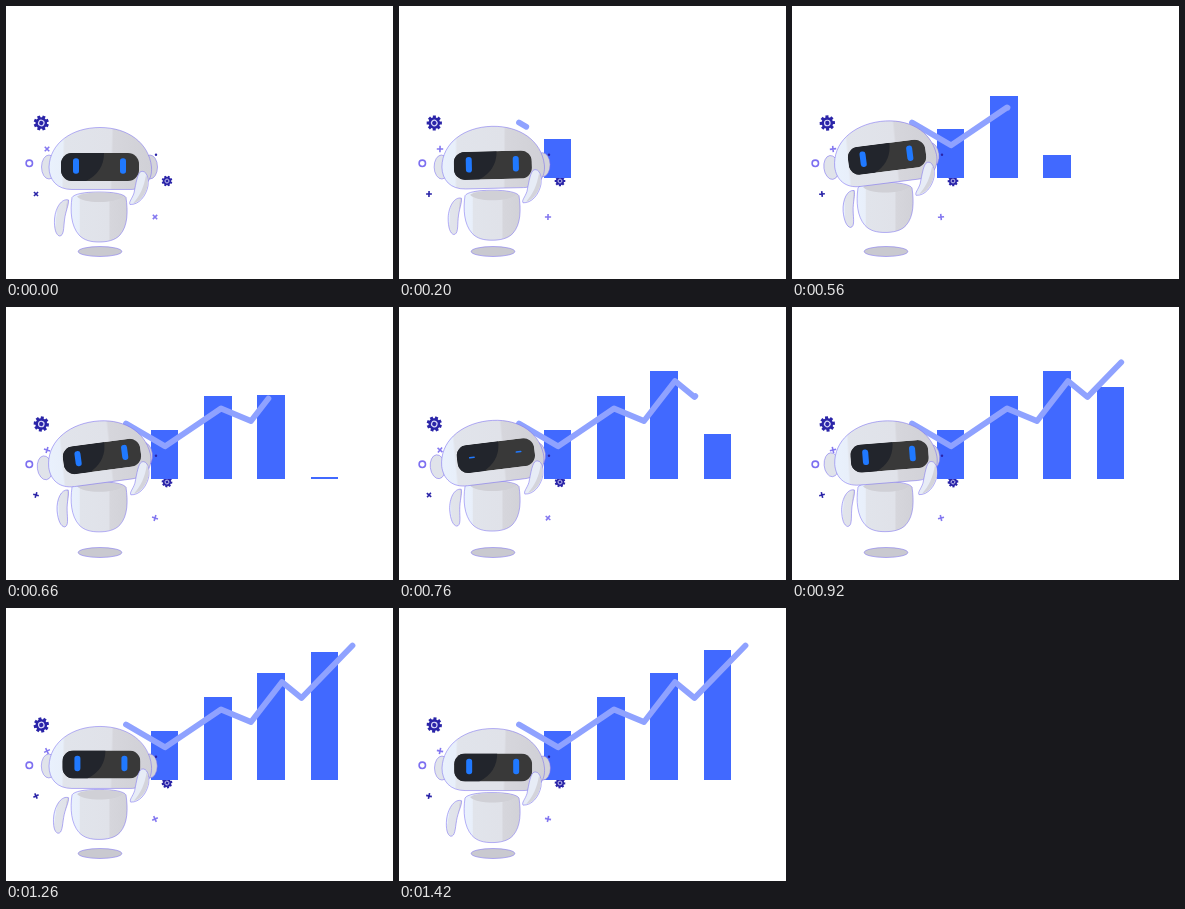
Write an HTML page that moves like this. It is 387 px wide and 273 px high and loops after 1.44 s.

```html
<!DOCTYPE html>
<html lang="en">
<head>
<meta charset="utf-8">
<title>Robot with growing chart</title>
<style>
html, body { margin: 0; width: 100%; height: 100%; overflow: hidden; background: #fff; }
svg { display: block; width: 100vw; height: 100vh; }
.edge { stroke: #766af0; stroke-width: .65; stroke-opacity: .8; }
</style>
</head>
<body>
<svg viewBox="0 0 387 273" xmlns="http://www.w3.org/2000/svg">
  <defs>
    <linearGradient id="shade" gradientUnits="userSpaceOnUse" x1="43" y1="150" x2="146" y2="153">
      <stop offset="0" stop-color="#e9f1fd"/><stop offset=".13" stop-color="#e8effa"/>
      <stop offset=".15" stop-color="#e1e4eb"/><stop offset=".6" stop-color="#e0e2e9"/>
      <stop offset=".62" stop-color="#d6d6dc"/><stop offset="1" stop-color="#d0d0d6"/>
    </linearGradient>
    <linearGradient id="bodyShade" href="#shade" x1="65" y1="0" x2="128" y2="0"/>
    <linearGradient id="armShade" href="#shade" x1="48" y1="210" x2="66" y2="212"/>
    <clipPath id="visor"><rect x="55" y="147" width="78" height="28" rx="11"/></clipPath>
  </defs>

  <g id="decor"></g>
  <circle cx="23.3" cy="157.3" r="3.2" fill="none" stroke="#7d6ff0" stroke-width="1.6"/>
  <g id="bars" fill="#4169ff" shape-rendering="crispEdges"></g>
  <path id="trend" fill="none" stroke="#8fa2ff" stroke-width="5.8" stroke-linejoin="round" stroke-linecap="round"/>

  <ellipse class="edge" cx="94" cy="245.5" rx="21.8" ry="5" fill="#c9c9d0"/>
  <g id="body">
    <path class="edge" fill="url(#bodyShade)" d="M66 191.5C64 205 65 220 73 229C78 234.500 85 236 93 236C101 236 109 234.500 114 229C122 220 122 205 120 191.500C118 188 108 186 93 186C78 186 68 188 66 191.500Z"/>
    <path fill="#d0d0d6" d="M71 190.500C76 187.500 84 186.500 93 186.500C103 186.500 112 187.500 117 190.500C112 194.500 104 196 93 196C83 196 75 194.500 71 190.500Z"/>
  </g>
  <path id="leftArm" class="edge" fill="url(#armShade)" d="M62.500 194C56 192 49.500 201 48.500 213C48 223 50 229 53.500 230C58 230 57.500 222 58.500 214C59.500 205 63 199 62.500 194Z"/>
  <g id="head">
    <g id="ears" class="edge">
      <ellipse cx="43" cy="161" rx="7.500" ry="12" fill="#e0e3ea"/>
      <ellipse cx="144" cy="161" rx="7.500" ry="12" fill="#d3d3da"/>
    </g>
    <path class="edge" fill="url(#shade)" d="M43 161C44 137 66 121.500 94 121.500C122 121.500 143 137 145.500 161C146.500 174 139 183.500 124 183.500H66C51 183.500 43 174 43 161Z"/>
    <g id="face">
      <g clip-path="url(#visor)">
        <path fill="#393939" d="M55 147H133V175H55Z"/>
        <path fill="#22252c" d="M55 147H98Q98 166 80 175H55Z"/>
      </g>
      <g id="eyes" fill="#2079ff"></g>
    </g>
  </g>
  <g id="rightArm">
    <path class="edge" fill="#e7ecf6" d="M124 198.500C122.500 196 126 193 128 187C130 177 131.500 167 135 165.500C140.500 164 143 172 142 180C140 190 133 199 124 198.500Z"/>
    <path fill="#d4d4db" d="M127 197.500C134 190 138 181 140 169C142 172 142 176 141.500 180C139.500 189 133 196.500 127 197.500Z"/>
  </g>
  <circle cx="150" cy="148.700" r="1.200" fill="#2a24a8"/>
</svg>

<script>
const LOOP = 1440, BOB = 1600, FLOOR = 172;
const DARK = '#2a24a8', LILAC = '#8478f0';
const $ = id => document.getElementById(id);

function set(el, attrs) {
  for (const k in attrs) el.setAttribute(k, attrs[k]);
}
function add(parent, tag, attrs = {}) {
  const el = document.createElementNS('http://www.w3.org/2000/svg', tag);
  set(el, attrs);
  parent.append(el);
  return el;
}

const ramp = (t, from, to) => Math.min(1, Math.max(0, (t - from) / (to - from)));
// Rises from 0 to 1 and falls back between two times
const bump = (t, from, to) => Math.sin(Math.PI * ramp(t, from, to)) ** 2;
const inOut = u => u < .5 ? 4 * u ** 3 : 1 - 4 * (1 - u) ** 3;
const outBack = (u, s) => 1 + (s + 1) * (u - 1) ** 3 + s * (u - 1) ** 2;

const bars = [
  { top: 49, start: 95, time: 450, back: 1.7 },
  { top: 83, start: 300, time: 320, back: 0 },
  { top: 107, start: 536, time: 430, back: 1 },
  { top: 130, start: 657, time: 790, back: 0 }
];
bars.forEach((b, i) => {
  b.el = add($('bars'), 'rect', { x: 144.9 + 53.25 * i, width: 27.5 });
});

const points = [[120, 116.5], [159, 139.3], [215, 101.5], [245, 114], [276, 74], [295.5, 90], [346.5, 37.5]];
const segments = points.slice(1).map(([x, y], i) => {
  const [x0, y0] = points[i], dx = x - x0, dy = y - y0;
  return { x0, y0, dx, dy, len: Math.hypot(dx, dy) };
});
const total = segments.reduce((sum, s) => sum + s.len, 0);

function trendPath(left) {
  let d = 'M' + points[0];
  for (const { x0, y0, dx, dy, len } of segments) {
    if (left <= 0) break;
    const k = Math.min(1, left / len);
    d += `L${x0 + dx * k} ${y0 + dy * k}`;
    left -= len;
  }
  return d;
}

function gear(x, y, r) {
  const g = add($('decor'), 'g');
  for (let a = 0; a < 360; a += 45) {
    add(g, 'rect', {
      x: -r * .2, y: -r, width: r * .4, height: r * .45,
      fill: DARK, transform: `rotate(${a})`
    });
  }
  add(g, 'circle', { r: r * .76, fill: DARK });
  add(g, 'circle', { r: r * .36, fill: 'none', stroke: '#d9d8f8', 'stroke-width': r * .16 });
  return { g, x, y, rate: .5 };
}
function plus(x, y, r, color) {
  const g = add($('decor'), 'g');
  add(g, 'path', { d: `M${-r} 0H${r}M0 ${-r}V${r}`, stroke: color, 'stroke-width': 1.6 });
  return { g, x, y, rate: 1 };
}
const spinners = [
  gear(35.3, 117, 7.6), gear(161, 175, 5.3),
  plus(41, 143, 3.2, LILAC), plus(30, 188, 2.9, DARK), plus(149, 211, 3.1, LILAC)
];
const eyes = [67, 114].map(x => add($('eyes'), 'rect', { x, width: 6 }));

function move(el, x, y, turn = 0, cx = 0, cy = 0) {
  set(el, { transform: `translate(${x} ${y}) rotate(${turn} ${cx} ${cy})` });
}

function draw(t) {
  for (const b of bars) {
    const h = b.top * outBack(ramp(t, b.start, b.start + b.time), b.back);
    set(b.el, { y: FLOOR - h, height: Math.max(0, h) });
  }
  const len = total * inOut(ramp(t, -60, 1295));
  set($('trend'), { d: trendPath(len), visibility: len > 1 ? 'visible' : 'hidden' });

  const lift = bump(t, 0, BOB), tilt = bump(t, 30, 1270);
  move($('body'), 0, -12 * lift);
  move($('leftArm'), 0, -11.5 * lift, 3 * ramp(t, 900, 1300) - 8.5 * bump(t, 0, 1200), 60, 196);
  move($('rightArm'), 3 * bump(t, 500, 1400), -11.5 * lift);
  move($('head'), -tilt, -8 * lift, -7.6 * tilt, 94, 159);
  move($('ears'), -4 * bump(t, 100, 1350), 0);
  move($('face'), 4.4 * bump(t, 250, 1500), -4 * lift);

  const h = 15.5 - 13.9 * bump(t, 650, 870);
  for (const eye of eyes) set(eye, { y: 160 - h / 2, height: h, rx: Math.min(2.8, h / 2) });

  const angle = 45 + .23 * t;
  for (const s of spinners) move(s.g, s.x, s.y, angle * s.rate);
}

function tick() {
  draw(performance.now() % LOOP);
  requestAnimationFrame(tick);
}
tick();
</script>
</body>
</html>
```
